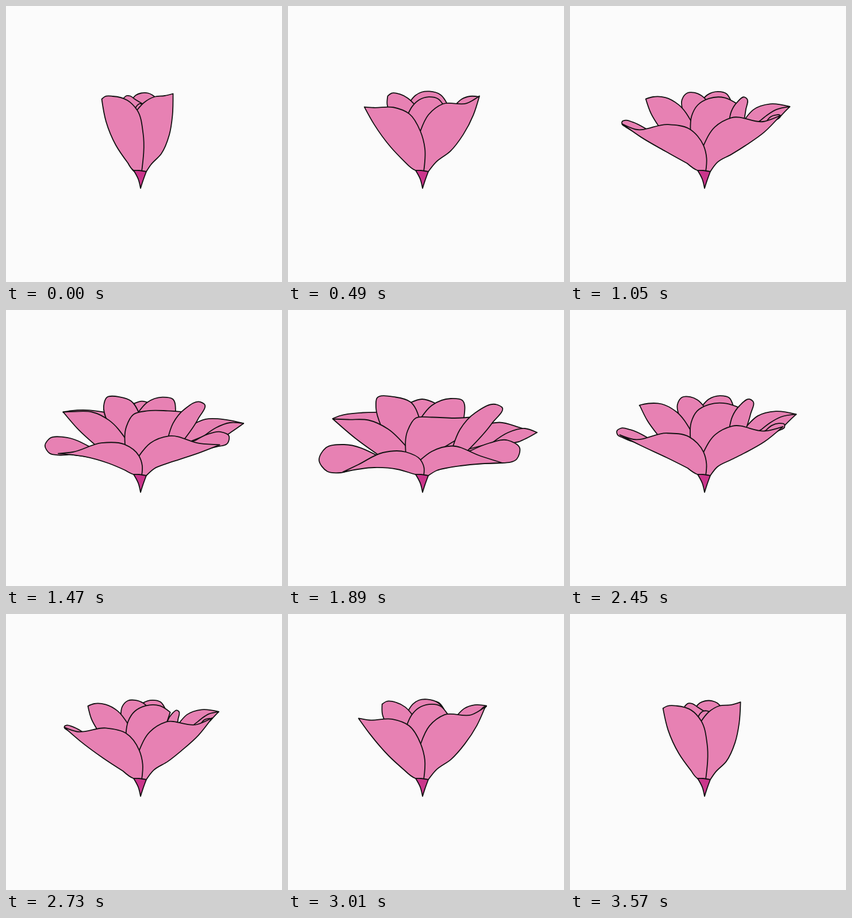
Animation, 480 px wide and 480 px high, one loop 3640 ms. Source, as an HTML page:

```html
<!DOCTYPE html>
<html lang="en">
<head>
<meta charset="utf-8">
<title>Blooming flower</title>
<style>
  html, body { margin: 0; width: 100%; height: 100%; overflow: hidden; background: #fbfbfb; }
  svg { display: block; width: 100%; height: 100%; }
  path { fill: #e781b3; stroke: #111; stroke-width: 1.8; stroke-linejoin: round; stroke-linecap: round; }
  .stem { fill: #cb368c; }
</style>
</head>
<body>
<svg viewBox="0 0 480 480"></svg>
<script>
const STEP = 70, COUNT = 52;

// Steps of opening for bud, cup, bowl and full bloom.
const KEYS = [0, 8, 16, 25];

// Where the outlines end: inside the flower or at the stem.
const HEART = '/ 236 264';
const STEM_LEFT = '236 288 / 222 286';
const STEM_RIGHT = '244 288 / 236 290';

// Back to front: key points of each visible edge, "/" follows a corner.
// Parts with fewer poses appear late; a single point is a folded part.
const PETALS = [
  ['back', HEART, [
    '236 164 240 163 246 164',
    '213 161 233 155 256 162']],
  ['backRight', HEART, [
    '228 162 237 155 248 152 260 154 270 166',
    '230 164 240 154 258 148.5 274 152.5 281 164',
    '231 188 250 166 283 154 303 157 306 187']],
  ['leftFold', HEART, [
    '126 163 143 164 165 169 185 178',
    '77.5 189 90 184 130 178.5 162 178']],
  ['backLeft', HEART, [
    '221 160 226 155 235 151.5 247 151.5 254 154.5 260 159',
    '211 167 221 155.5 232 149.5 246 148 267 154.5 279.5 172',
    '193 181 191 164 200 151.5 212 151 223 156 235 167',
    '162 202 153 170 154.5 153.5 187 151.5 213 160 229 190']],
  ['left', HEART, [
    '204 166 203.5 163 204 161 / 210 156 216 156.5 224 162 239 171',
    '171 183 168 172 169 156 / 176 151 192 153 206 160 218 172',
    '152 213 137 189 126.5 162.5 / 140 159 162 160 186 173 211 207',
    '160 254 117 223 78 189.5 / 105 190.5 140 191.5 174 207 206 238']],
  ['center', HEART, [
    '225 178 228 173 232 170 236 170 240 171.5 246 174',
    '206 190 215 174 228 162 246 156.5 264 160 275 174',
    '210 221 211 194 221 174 241 161.5 270 159.5 292 169',
    '205 252 208 210 222 188 250 186.5 290 188 332 185']],
  ['backWing', HEART, [
    '285 164',
    '295 170 304 162 321 156 339 157',
    '306 200 321 183 352 172.5 388.5 177.5',
    '330 204 368 195.5 405 205 433 213']],
  ['wingFold', HEART, [
    '339 158',
    '330 205 343 194.5 361 183.5 388.5 177.5 / 379 187 368 199',
    '355 231 383 213 412 206 433 213 / 417 222 402 229']],
  ['right', HEART, [
    '283 190',
    '276 202 280 183 291 165 306.5 154 311 157 309 179 305 203',
    '286 240 299 208 326 178.5 363 164.5 372 169 354 198 312 245']],
  ['frontLeftFold', HEART, [
    '130 180',
    '104 222 91 214 85 209.5 85 204 91 201.5 106 205 131 217.5',
    '118 275 92 283 68 280.5 54 261 66 239.5 97 234 157 254']],
  ['frontRightFold', HEART, [
    '334 163',
    '344 204.5 351 197 361 193.5 369 193.5 370 197 366 201',
    '318 244.5 350 231.5 382 226.5 403 240 398 259 372 266']],
  ['frontRight', STEM_RIGHT, [
    '228 181 240 168 258 158 276 156 290.5 152.5 / 289.5 190 284 224 270 257 252 276',
    '230.5 223 245 192 271 172 316 171 339 157 / 327 189.5 308 223 284 252 258 271',
    '232.5 245.5 253 213 282 197.5 341 205 370 195 / 339 224 304 246 280 259 256 272',
    '230 261 250 246 285 236.5 335 254 373 266 / 335 267.5 300 271 275 275 259 279']],
  ['frontLeft', STEM_LEFT, [
    '212 273 191 242 174 201 166.5 162 / 172 157.5 186 157 211 164 228 181 238.5 222',
    '203 272 177 246 146 206 128 177.5 / 146 179.5 183 179 211 191 230.5 223 238 252',
    '204 274 165 254 120 231 85.5 209 / 109 219.5 168 210 207 217 232.5 245.5 237.5 267',
    '210 282.5 190 277 150 274 95 282 / 122 269 165 248 205 247 230 260 236.5 274']]
];
const STEM = '222 286 231 286 244 288 / 238.5 303 234 317 / 230 301';

const mix = (a, b, k) => [a[0] + (b[0] - a[0]) * k, a[1] + (b[1] - a[1]) * k];
const dist = (a, b) => Math.hypot(b[0] - a[0], b[1] - a[1]) || 1e-3;

function points(text) {
  const n = text.match(/[\d.]+/g).map(Number);
  return n.filter((_, i) => i % 2 === 0).map((x, i) => [x, n[2 * i + 1]]);
}

const runSizes = text => text.split('/').map(run => points(run).length);

// Smooth curve through q, as path commands following its first point.
function curve(q) {
  if (q.length === 2) return 'L' + q[1];
  const tangents = q.map((p, i) => {
    const a = q[i - 1], b = q[i + 1];
    if (!a || !b) return null;
    const la = dist(a, p), lb = dist(p, b);
    return [0, 1].map(c => ((p[c] - a[c]) / la * lb + (b[c] - p[c]) / lb * la) / (la + lb));
  });
  const handle = (i, len) => tangents[i] && [q[i][0] + tangents[i][0] * len, q[i][1] + tangents[i][1] * len];
  return q.slice(1).map((end, i) => {
    const len = dist(q[i], end) / 3;
    let c1 = handle(i, len), c2 = handle(i + 1, -len);
    c1 = c1 || mix(q[i], c2, 0.5);
    c2 = c2 || mix(end, c1, 0.5);
    return 'C' + [c1, c2, end];
  }).join('');
}

function outline(q, sizes) {
  let at = 0, d = 'M' + q[0];
  sizes.forEach((size, i) => {
    const run = q.slice(Math.max(at - 1, 0), at + size);
    if (i === sizes.length - 1) run.push(q[0]);
    d += curve(run);
    at += size;
  });
  return d + 'Z';
}

const svg = document.querySelector('svg');

function addPath(name) {
  const el = document.createElementNS(svg.namespaceURI, 'path');
  el.setAttribute('class', name);
  return svg.appendChild(el);
}

const petals = PETALS.map(([name, tail, poses]) => ({
  el: addPath(name),
  first: KEYS.length - poses.length,
  poses: poses.map(points),
  tail: points(tail),
  sizes: runSizes(poses[poses.length - 1] + ' ' + tail)
}));
addPath('stem').setAttribute('d', outline(points(STEM), runSizes(STEM)));

function pose(open) {
  let i = 0;
  while (i < KEYS.length - 2 && open >= KEYS[i + 1]) i++;
  const k = (open - KEYS[i]) / (KEYS[i + 1] - KEYS[i]);
  for (const { el, first, poses, tail, sizes } of petals) {
    const a = poses[i - first], b = poses[i + 1 - first];
    const edge = a ? b.map((p, j) => mix(a[j % a.length], p, k)) : [];
    // A petal that is still folded at both ends of this stretch stays hidden.
    el.setAttribute('d', edge.length > 1 ? outline([...edge, ...tail], sizes) : '');
  }
}

const start = performance.now();
let shown = -1;

function tick() {
  const step = Math.floor((performance.now() - start) / STEP) % COUNT;
  if (step !== shown) {
    shown = step;
    pose(COUNT / 2 - Math.abs(COUNT / 2 - step));
  }
  requestAnimationFrame(tick);
}
tick();
</script>
</body>
</html>
```
